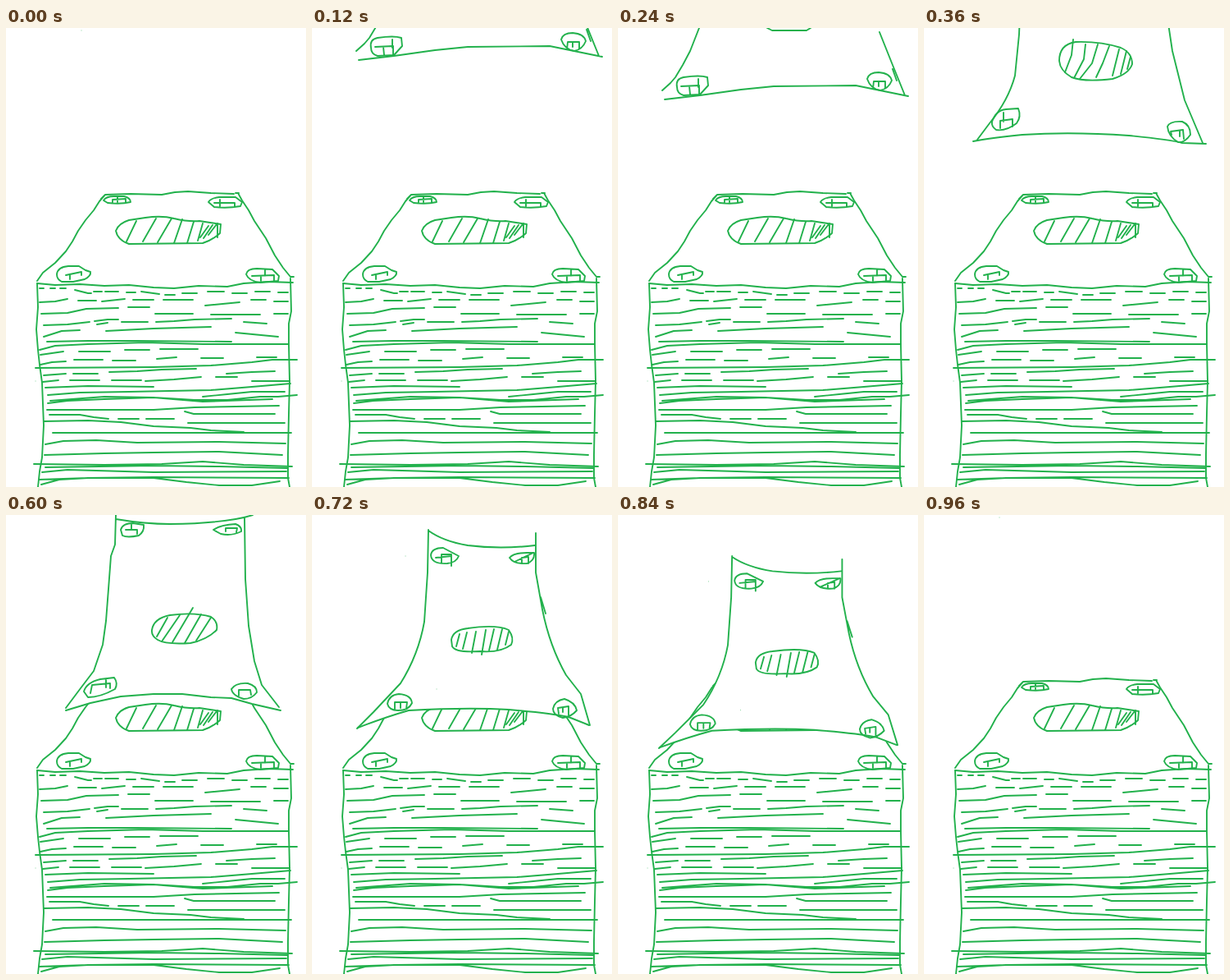
Animation of 366 by 559 pixels, one loop 1080 ms. Source, as an HTML page:

```html
<!DOCTYPE html>
<html lang="en">
<head>
<meta charset="utf-8">
<title>Falling card</title>
<style>
html, body { margin: 0; width: 100%; height: 100%; overflow: hidden; background: #fff; }
svg { display: block; width: 366px; height: 559px; }
path { fill: none; stroke: #22b14c; stroke-width: 1.9; stroke-linecap: round; stroke-linejoin: round; vector-effect: non-scaling-stroke; }
path.fill { fill: #fff; stroke: none; }
path.speck { stroke-width: 1; stroke-opacity: .6; }
</style>
</head>
<body>
<svg id="stage" viewBox="0 0 366 559"></svg>
<script>
const STEP = 120, LOOP = 1080;

const stack = [
  // top face
  'M38 308L45 298L60 286L73 272L81 260L88 247L97 234L107 222L114 211L121 203M116 208L121 203L152 202L190 203L206 200L222 199L250 201L278 202M280 201H284',
  'M283 201L288 210L296 222L303 235L317 256L328 277L338 292L347 303H351',
  'M38 311L60 313L90 312L120 314L150 313L180 316L205 317L235 314L270 315L290 311L320 309L350 310',
  // slots
  'M119 210Q122 205 132 205L144 205Q152 207 152 212Q140 215 124 213ZM130 212V209L146 208V213M136 206V212',
  'M247 212Q250 207 260 206L280 206L288 212L286 217Q270 220 254 218ZM254 213H279V217M261 209V217',
  'M62 300Q63 291 76 290L89 290L97 295L103 297Q104 302 96 306L82 309L68 309Q62 306 62 300M73 301L92 297V301M78 301V306',
  'M293 300Q294 293 306 293L325 294L333 302L332 308L310 310Q296 308 293 300M300 302L327 301V307M311 302V308M316 295V302',
  // hatched oval
  'M134 247Q137 238 150 234L170 231Q190 228 205 232Q222 236 236 235L249 237L262 239L261 250Q252 258 240 262L150 263Q136 258 134 247',
  'M159 235L147 260M183 232L167 260M202 232L185 261M215 233L205 262M229 236L221 262M240 238L234 259M247 241L237 255M252 240L241 256M257 239L247 252M258 238L258 255',
  // sides
  'M38 311L39 340L37 367L39 392L41 410L44 432L46 484L44 523L41 540L39 559',
  'M347 305L348 345L345 360L345 385L346 430L345 470L344 520L344 548L346 559',
  // strata, top to bottom
  'M41 317h5M54 317h6M66 317h7M84 319l16 4h4M107 321h10M121 321h16M147 322h11M165 321l22 3M194 325h12M215 323h18M246 321h20M276 323h18M304 321h18M332 322h12',
  'M41 334L60 333L75 330M88 332h22M117 333L145 330M155 331h25M192 331h36M299 331h18M327 333h17M243 338L285 334',
  'M43 348L75 347L98 342L137 341M149 340h26M182 348h46M250 349h60M327 348h17M108 357L124 355L137 355',
  'M46 362L75 361L102 358M111 361L124 359M141 358h32M183 358L205 357L230 355L275 354M290 358L318 360M46 376L68 369L90 368M122 369L180 366L250 364M280 371L332 376',
  'M50 382L100 381L160 381L275 382M41 392L60 387L100 385L170 383L240 385H345M42 398L70 394M89 394h38M145 392h30M188 391h46',
  'M42 410L56 407L73 406M83 404h35M130 405h28M184 403L208 401M238 402h27M306 401h24M36 414L180 413L250 411L300 407L325 404H355',
  'M46 423L73 421M82 421h30M126 419L160 418L190 416L232 415M269 421L300 419L328 418M45 431L64 429M78 429h36M129 429h36M170 430L205 428L238 425M256 425h26M300 430h46',
  'M48 438L100 436L180 437M51 447L90 444L150 443L250 441L300 437L347 433M240 449L270 446L300 443L340 443',
  'M51 457L75 454L120 452L180 450L230 453L270 453L310 449H332L355 447M54 454L120 449L180 450L240 455L325 452M50 465L180 465L230 462L333 460',
  'M218 467L229 470H328M53 471L90 471L107 474L125 476M137 476h25M171 476h34M46 479L100 478L140 480L180 485L225 487L250 490L290 492M222 481L340 481',
  'M57 493H200L348 493M48 507L70 503L110 502L160 505L260 504L341 506M47 520L120 518L180 517L260 516L337 520',
  'M34 531L120 532L190 531L240 528L290 532L349 534M48 535L180 533L260 534L343 536M44 541L75 538L180 541L342 540',
  'M40 550L100 548L180 548L220 553L260 557L300 557L334 552M43 556L65 550L100 548L180 547L345 548'
];

// Each pose: closed white body, then pen strokes.
const poses = {
  rest: { lines: [] },
  high: {
    lines: [
      'M99 0L88 28L79 45L70 60L64 67L54 76M57 87L100 82L150 75L190 71L290 70L354 83M319 5L335 45L350 82M335 50L340 64',
      'M72 72Q70 62 80 60Q100 57 109 60L110 70L100 81L80 82Q72 80 72 72M77 71L99 70V81M87 71L88 81M98 62V72',
      'M304 62Q306 54 318 54Q332 55 334 64Q330 74 320 76Q308 74 304 62M311 74L312 65L326 65V73M318 65V71',
      'M182 0L188 3H230L235 0'
    ]
  },
  mid: {
    lines: [
      'M118 12L116 60L111 110Q103 140 80 168L65 188M125 11L135 9M281 4L293 7M295 0L297 40L303 80L318 140L340 192',
      'M60 190Q80 186 120 182Q180 178 250 183Q300 188 315 192L344 193',
      'M165 92Q165 72 185 69Q215 68 240 76Q254 82 254 96Q250 108 230 114Q195 118 180 112Q166 104 165 92',
      'M182 66L180 85L172 106M197 72L195 90L183 113M212 72L205 95L190 114M226 74L218 95L210 112M238 78L230 110M247 80L240 108M252 87L248 102',
      'M83 166Q88 152 100 151L115 150Q119 160 113 168Q100 178 88 176Q82 172 83 166M93 174V165L108 163V172M97 155V166',
      'M297 172Q300 165 315 166Q325 170 325 182Q318 192 310 191Q298 184 297 172M302 182L301 178L316 176L317 187M312 178V184'
    ]
  },
  low: {
    body: 'M134 0L133 36L122 129L118 158L107 190L91 211L73 238L103 229L140 221L180 218L215 218L250 222L275 223L300 230L335 238L312 207L303 178L296 135L291 0Z',
    lines: [
      'M134 0L133 36L128 50L125 90L122 129L118 158L107 190L91 211L73 235M134 5Q170 11 200 11Q270 10 301 0M291 3L292 78L296 135L303 178L312 207L333 234',
      'M73 238L103 229L140 221L180 218L215 218L250 222L275 223L300 230L335 238',
      'M140 18Q142 10 155 10L168 12Q169 20 162 25Q148 28 142 25ZM146 18H160V23M153 18V12',
      'M253 18Q262 12 280 11Q288 14 287 20Q275 26 262 23ZM268 20V16H282L281 21',
      'M95 215Q98 204 115 200L132 198Q137 205 133 212Q115 222 100 222ZM103 217L105 207L127 205V211M122 201V210',
      'M275 212Q280 204 295 205Q306 208 306 216Q300 224 290 224Q276 220 275 212M284 220V213H298L299 219',
      'M178 140Q180 126 200 122Q230 118 250 124Q259 130 257 140Q245 152 225 156Q195 158 185 152Q177 147 178 140',
      'M197 125L184 148M212 122L190 154M228 113L203 155M238 121L218 156M250 125L232 153'
    ]
  },
  land: {
    body: 'M142 18L137 130Q130 170 108 205L56 259Q90 246 118 238Q190 234 240 237Q290 241 313 246L338 256L328 218L310 195Q290 160 281 115L273 22Z',
    lines: [
      'M142 18L141 70L137 130Q130 170 108 205L75 240L55 260M142 19Q160 32 190 37Q230 42 272 37',
      'M273 22V70L281 115Q290 160 310 195L328 218L339 256M279 100L285 120',
      'M56 259Q90 246 118 238Q190 234 240 237Q290 241 313 246L338 256',
      'M145 49Q146 40 160 40L179 50Q176 58 165 59Q146 60 145 49M151 52L170 50M158 58V48H170V62',
      'M241 52Q246 46 262 46L271 46Q272 56 262 59Q246 60 241 52M247 57L270 46M256 58V52L264 51V59',
      'M92 230Q94 219 106 218Q121 219 122 229Q118 238 105 238Q94 238 92 230M101 237V228H116L115 236M108 229V235',
      'M294 236Q296 226 308 224Q321 228 323 238Q316 246 306 247Q294 244 294 236M301 242L300 235L313 233V244M306 235V240',
      'M170 152Q172 140 190 138Q225 133 240 140Q247 150 243 158Q230 168 205 166Q175 168 171 160Z',
      'M180 145L176 160M189 143L184 163M200 142L195 168M212 140L207 170M222 139L216 165M232 139L226 164M240 142L236 158'
    ]
  }
};

// One entry per step: pose and its placement.
const steps = [
  ['rest'],
  ['high', 'translate(0 -48)'],
  ['high'],
  ['mid', 'translate(0 -52)'],
  ['mid'],
  ['low'],
  ['land'],
  ['land', 'matrix(1.025 0 0 .967 -6.4 32.6)'],
  ['rest']
];

const stroke = d => `<path d="${d}"/>`;
const speck = (x, y) => `<path class="speck" d="M${x} ${y}h.1"/>`;
const draw = ({ body, lines }) =>
  (body ? `<path class="fill" d="${body}"/>` : '') + lines.map(stroke).join('');

poses.rest.lines = [];
const specks = { rest: speck(92, 3), land: speck(114, 50) + speck(152, 212) };

const stage = document.getElementById('stage');
stage.innerHTML = `<g>${stack.map(stroke).join('')}${speck(36, 430)}</g><g id="card"></g>`;
const card = document.getElementById('card');
let shown = -1;

function update(t) {
  const i = Math.floor((t % LOOP) / STEP);
  if (i === shown) return;
  shown = i;
  const [pose, place = 'translate(0 0)'] = steps[i];
  card.innerHTML = draw(poses[pose]) + (specks[pose] || '');
  card.setAttribute('transform', place);
}

const start = performance.now();
function tick() {
  update(performance.now() - start);
  requestAnimationFrame(tick);
}
tick();
</script>
</body>
</html>
```
